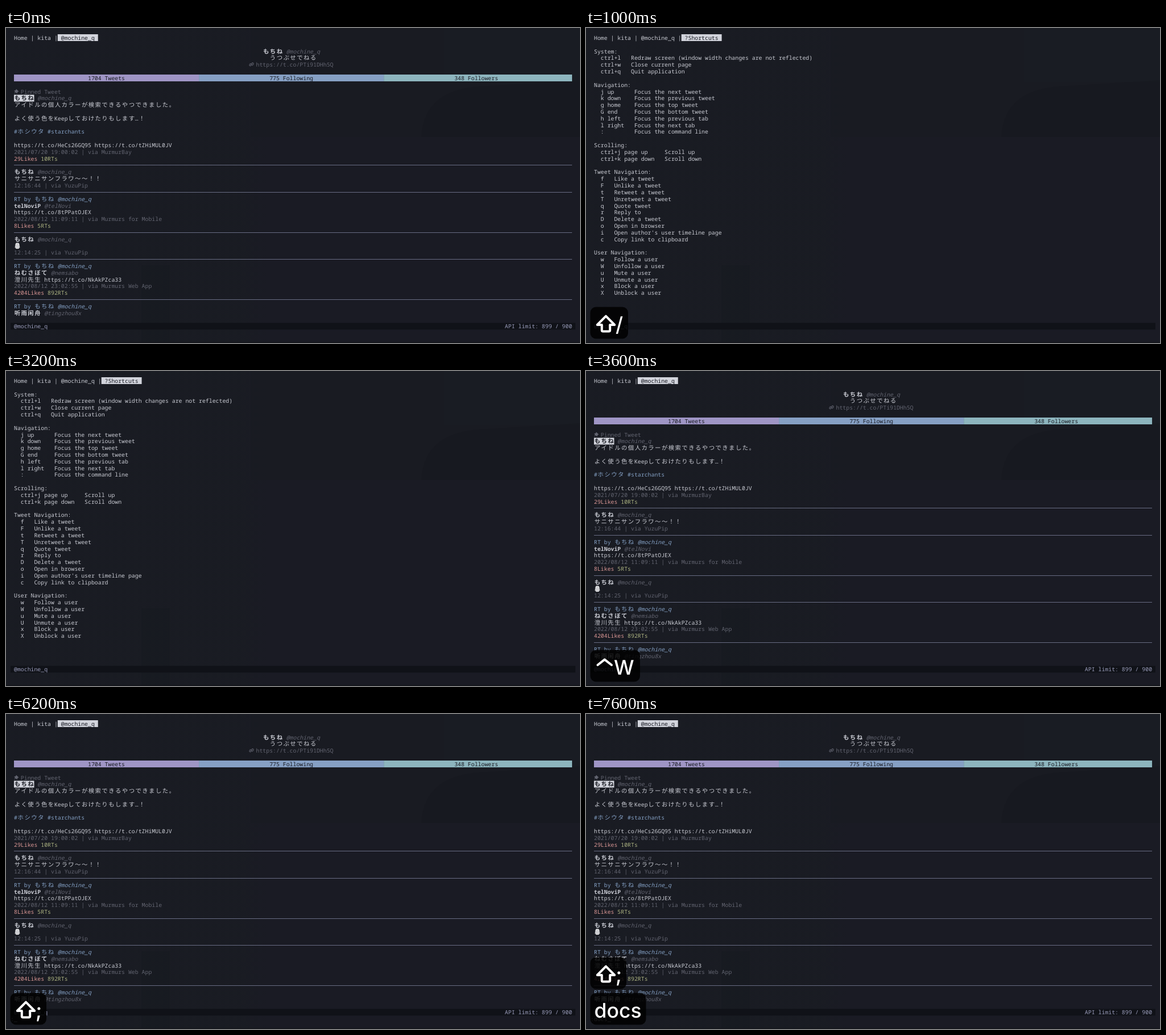
Animation of 1009 by 555 pixels, one loop 8 s. Source, as an HTML page with a canvas:

```html
<!DOCTYPE html>
<html lang="ja">
<head>
<meta charset="utf-8">
<title>Terminal client</title>
<style>
html, body { margin: 0; width: 100%; height: 100%; overflow: hidden; background: #1a1b24; }
canvas { display: block; }
</style>
</head>
<body>
<canvas id="stage" width="1009" height="555"></canvas>
<script>
const ctx = document.getElementById('stage').getContext('2d');
const LOOP = 8000, LEFT = 14, TOP = 11.6, CELL_W = 5.91, CELL_H = 11.82;
const MONO = '9.85px "Noto Sans Mono", monospace';
const CJK = '10.4px "Noto Sans CJK JP", "Noto Sans CJK", sans-serif';
const KEY_FONT = '500 35.5px Inter, "Liberation Sans", sans-serif';
const C = {
  fg: '#c9cbd3', dim: '#626470', blue: '#84a0c4', red: '#da9795', green: '#aeb583',
  dark: '#191b23', light: '#d2d4dc', rule: '#686c83', status: '#9a9dbb',
  purple: '#9f95c5', sky: '#86a0c4', teal: '#8db5be'
};
const NAME = 'もちね', HANDLE = '@mochine_q';

const HELP = `System:
  ctrl+l   Redraw screen (window width changes are not reflected)
  ctrl+w   Close current page
  ctrl+q   Quit application

Navigation:
  j up      Focus the next tweet
  k down    Focus the previous tweet
  g home    Focus the top tweet
  G end     Focus the bottom tweet
  h left    Focus the previous tab
  l right   Focus the next tab
  :         Focus the command line

Scrolling:
  ctrl+j page up     Scroll up
  ctrl+k page down   Scroll down

Tweet Navigation:
  f   Like a tweet
  F   Unlike a tweet
  t   Retweet a tweet
  T   Unretweet a tweet
  q   Quote tweet
  r   Reply to
  D   Delete a tweet
  o   Open in browser
  i   Open author's user timeline page
  c   Copy link to clipboard

User Navigation:
  w   Follow a user
  W   Unfollow a user
  u   Mute a user
  U   Unmute a user
  x   Block a user
  X   Unblock a user`.split('\n');

const colX = col => LEFT + col * CELL_W;
const rowY = row => TOP + row * CELL_H;
const isWide = ch => /[\u3000-\u9fff\uff00-\uffef]/.test(ch);

function rect(x, y, w, h, color) {
  ctx.fillStyle = color;
  ctx.fillRect(x, y, w, h);
}

// Writes text on the terminal grid and returns the next free column.
function put(col, row, text, color = C.fg, style = '') {
  const y = rowY(row) + 9.4;
  ctx.fillStyle = color;
  for (const ch of text) {
    const wide = isWide(ch), span = wide ? 2 : 1;
    ctx.font = `${style} ${wide ? CJK : MONO}`;
    ctx.textAlign = wide ? 'center' : 'left';
    if (ch !== ' ') ctx.fillText(ch, colX(col) + (wide ? CELL_W : 0), y);
    col += span;
  }
  return col;
}

function spans(col, row, ...parts) {
  for (const part of parts) col = put(col, row, ...part);
}

function stroke(path, color, width) {
  ctx.strokeStyle = color;
  ctx.lineWidth = width;
  ctx.lineCap = ctx.lineJoin = 'round';
  ctx.stroke(new Path2D(path));
}

function fill(path, color) {
  ctx.fillStyle = color;
  ctx.fill(new Path2D(path));
}

const rule = row => rect(LEFT, Math.floor(rowY(row) + 5.7), 981, 1, C.rule);

function author(row, name, handle) {
  const next = put(0, row, name, C.fg, 'bold');
  put(next + 1, row, handle, C.dim, 'italic');
}

function sharedBy(row) {
  spans(0, row, [`RT by ${NAME} `, C.blue], [HANDLE, C.blue, 'italic']);
}

function reactions(row, likes, shares) {
  spans(0, row, [likes + 'Likes ', C.red], [shares + 'RTs', C.green]);
}

function backdrop() {
  rect(0, 0, 1009, 555, '#1a1b24');
  const glow = ctx.createLinearGradient(0, 0, 460, 0);
  glow.addColorStop(0, 'rgba(25,28,34,.6)');
  glow.addColorStop(.9, 'rgba(25,28,34,.6)');
  glow.addColorStop(1, 'rgba(25,28,34,0)');
  rect(0, 0, 460, 555, glow);
  rect(430, 0, 579, 192, 'rgba(24,27,32,.35)');
  rect(770, 0, 239, 95, 'rgba(28,31,37,.3)');
  fill('M730 192 Q735 110 830 103 L1009 92 V192 Z', 'rgba(21,22,28,.3)');
  rect(238, 418, 50, 137, 'rgba(20,24,31,.3)');
  rect(0, 553, 1009, 2, '#14161c');
}

function tabs(before, active) {
  const start = put(0, 0, before);
  rect(colX(start), 11, (active.length + 2) * CELL_W, 12, C.light);
  put(start + 1, 0, active, C.dark);
}

function statusBar() {
  rect(8, 519.5, 993, 11.8, '#101218');
  put(0, 43, HANDLE, C.status);
}

function profile() {
  spans(74, 2, [NAME + ' ', C.fg, 'bold'], [HANDLE, C.dim, 'italic']);
  put(76, 3, 'うつぶせでねる');
  stroke('M430.2 64.4 l2-2.4 q1.5-1.2 2.6 0 q.8 1.2-.3 2.3 l-1.5 1.6 M432.6 64 l-2 2.2 q-1.4 1.2-2.5 0 q-.7-1 .3-2.2 l1.3-1.4', C.dim, 1.1);
  put(72, 4, 'https://t.co/PTi91DHh5Q', C.dim);

  const counts = [
    [0, 55, 22, '1704 Tweets', C.purple],
    [55, 55, 76, '775 Following', C.sky],
    [110, 56, 131, '348 Followers', C.teal]
  ];
  for (const [col, width, textCol, label, color] of counts) {
    rect(colX(col), 82, width * CELL_W, 12, color);
    put(textCol, 6, label, C.dark);
  }
}

function timeline() {
  fill('M18 107.6 L22.6 112 L20.5 112.6 L19.4 115.4 L17 113.3 L14.2 116.6 L16 112.4 L14.2 110.4 L17.2 109.6 Z', C.dim);
  put(2, 8, 'Pinned Tweet', C.dim);
  rect(LEFT, 117.6, 6 * CELL_W, 12, C.light);
  spans(0, 9, [NAME, C.dark, 'bold'], [' ' + HANDLE, C.dim, 'italic']);
  put(0, 10, 'アイドルの個人カラーが検索できるやつできました。');
  put(0, 12, 'よく使う色をKeepしておけたりもします…！');
  put(0, 14, '#ホシウタ #starchants', C.blue);
  put(0, 16, 'https://t.co/HeCs26GQ95 https://t.co/tZHiMUL0JV');
  put(0, 17, '2021/07/20 19:00:02 | via MurmurBay', C.dim);
  reactions(18, 29, 10);
  rule(19);

  author(20, NAME, HANDLE);
  put(0, 21, 'サニサニサンフラワ～～！！');
  put(0, 22, '12:16:44 | via YuzuPip', C.dim);
  rule(23);

  sharedBy(24);
  author(25, 'telNoviP', '@telNovi');
  put(0, 26, 'https://t.co/8tPPatOJEX');
  put(0, 27, '2022/08/12 11:09:11 | via Murmurs for Mobile', C.dim);
  reactions(28, 8, 5);
  rule(29);

  author(30, NAME, HANDLE);
  fill('M18 378.4 h4 l1.4 2.2 l1 6.4 l-1.8 .7 v1.3 h-5.2 v-1.3 l-1.8-.7 l1-6.4 Z', '#dedfe1');
  stroke('M20 380 v8 M17.4 382.5 v4.5 M22.6 382.5 v4.5', '#94969c', .6);
  put(0, 32, '12:14:25 | via YuzuPip', C.dim);
  rule(33);

  sharedBy(34);
  author(35, 'ねむさぼて', '@nemsabo');
  put(0, 36, '澄川先生 https://t.co/NkAkPZca33');
  put(0, 37, '2022/08/12 23:02:55 | via Murmurs Web App', C.dim);
  reactions(38, 4204, 892);
  rule(39);

  sharedBy(40);
  author(41, '听雨闲舟', '@tingzhou8x');
}

function userPage() {
  tabs('Home | kita |', HANDLE);
  profile();
  timeline();
  statusBar();
  put(146, 43, 'API limit: 899 / 900', C.status);
}

function helpPage() {
  tabs(`Home | kita | ${HANDLE} |`, '?Shortcuts');
  HELP.forEach((line, i) => put(0, i + 2, line));
  statusBar();
}

const ICONS = {
  shift: 'M35 507.6 L50.2 523 H42.2 V532.5 Q42.2 534.6 40 534.6 H30 Q27.8 534.6 27.8 532.5 V523 H19.8 Z',
  ctrl: 'M20.5 518 L32.7 508.4 L45 518'
};

function keyCap(width, icon, textX, text, { alpha = 1, lift = 0 } = {}) {
  ctx.save();
  ctx.translate(0, -lift);
  ctx.globalAlpha = alpha;
  ctx.fillStyle = 'rgba(0,0,0,.86)';
  ctx.beginPath();
  ctx.roundRect(7.5, 491.5, width, 56, 10);
  ctx.fill();
  if (icon) stroke(ICONS[icon], '#fff', 4);
  ctx.font = KEY_FONT;
  ctx.textAlign = 'left';
  ctx.fillStyle = '#fff';
  ctx.fillText(text, textX, 535);
  ctx.restore();
}

const HELP_AT = 1000, CLOSE_AT = 3600, PROMPT_AT = 6200, TYPE_AT = 6800;
const KEY_HOLD = 2000, KEY_LIFE = 2200, TYPE_STEP = 200;

function render(t) {
  backdrop();
  if (t >= HELP_AT && t < CLOSE_AT) helpPage();
  else userPage();

  const typed = 'docs'.slice(0, Math.max(0, Math.floor((t - TYPE_AT) / TYPE_STEP) + 1));
  if (t >= PROMPT_AT) put(-1, 44, `:${typed}_`);

  const helpKeyAge = t - HELP_AT, closeKeyAge = t - CLOSE_AT;
  if (helpKeyAge >= 0 && helpKeyAge < KEY_LIFE) {
    keyCap(66.5, 'shift', 52, '/', { alpha: helpKeyAge < KEY_HOLD ? 1 : .5 });
  }
  if (closeKeyAge >= 0 && closeKeyAge < KEY_LIFE) keyCap(87.5, 'ctrl', 49, 'W');
  if (t >= PROMPT_AT) keyCap(63.5, 'shift', 52, ';', { lift: typed ? 63 : 0 });
  if (typed) {
    ctx.font = KEY_FONT;
    keyCap(ctx.measureText(typed).width + 15, '', 14.5, typed);
  }
}

ctx.textRendering = 'geometricPrecision';
const start = performance.now();
function tick() {
  render((performance.now() - start) % LOOP);
  requestAnimationFrame(tick);
}
tick();
</script>
</body>
</html>
```
